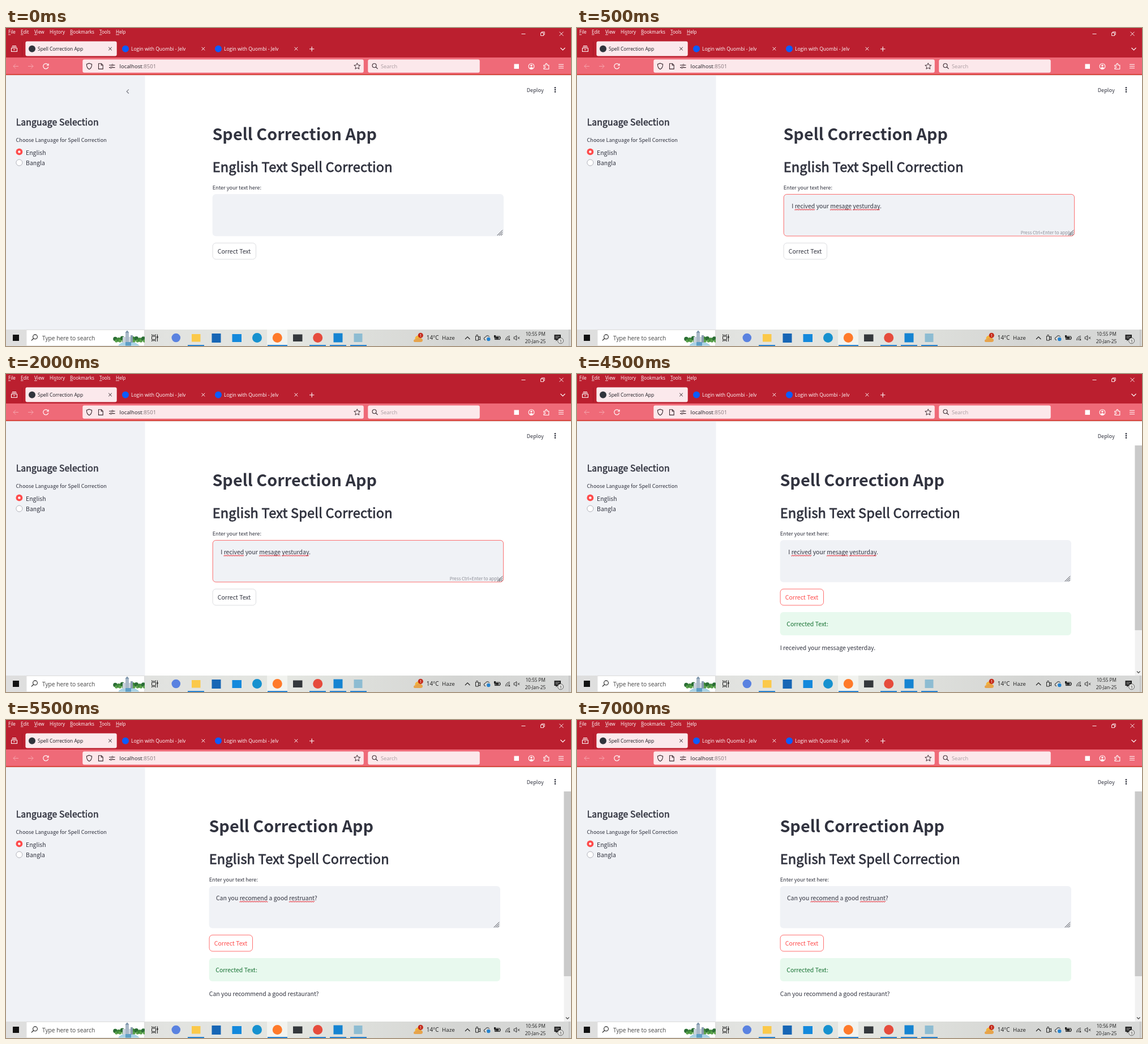
These frames come from a looping animation (998 px wide and 561 px high, 8 s). An HTML page with a canvas:

```html
<!DOCTYPE html>
<html lang="en">
<head>
<meta charset="utf-8">
<title>Spell Correction App</title>
<style>
html, body { margin: 0; width: 100%; height: 100%; overflow: hidden; background: #fff; }
canvas { display: block; width: 998px; height: 561px; }
</style>
</head>
<body>
<canvas id="stage"></canvas>
<script>
const W = 998, H = 561, LOOP = 8000;
const canvas = document.getElementById('stage');
const ctx = canvas.getContext('2d');
const ratio = window.devicePixelRatio || 1;
canvas.width = W * ratio;
canvas.height = H * ratio;

const PAGE = '"Noto Sans CJK JP", "Noto Sans CJK SC", sans-serif';
const UI = '"Open Sans", "Noto Sans", sans-serif';
const BODY = 10.47, LABEL = 9.16;
const INK = '#31333f', ACCENT = '#ff4b4b';

const scenes = [
  { start: 0, clock: '10:55 PM', arrow: true },
  { start: 500, clock: '10:55 PM', input: ' I recived your mesage yesturday.', focus: true },
  { start: 3000, clock: '10:55 PM', input: ' I recived your mesage yesturday.', result: 'I received your message yesterday.' },
  { start: 5500, clock: '10:56 PM', input: 'Can you recomend a good restruant?', result: 'Can you recommend a good restaurant?' }
];
const misspelled = ['recived', 'mesage', 'yesturday', 'recomend', 'restruant'];

function rect(x, y, w, h, color) {
  ctx.fillStyle = color;
  ctx.fillRect(x, y, w, h);
}

function box(x, y, w, h, r, fill, border, line = 0.8) {
  ctx.beginPath();
  ctx.roundRect(x, y, w, h, r);
  if (fill) { ctx.fillStyle = fill; ctx.fill(); }
  if (border) { ctx.strokeStyle = border; ctx.lineWidth = line; ctx.stroke(); }
}

function disc(x, y, r, fill, border, line = 0.8) {
  box(x - r, y - r, 2 * r, 2 * r, r, fill, border, line);
}

function stroke(d, color, line = 1) {
  ctx.strokeStyle = color;
  ctx.lineWidth = line;
  ctx.stroke(new Path2D(d));
}

function shape(d, color) {
  ctx.fillStyle = color;
  ctx.fill(new Path2D(d));
}

function text(str, x, y, size, color = INK, family = PAGE, weight = 400) {
  ctx.font = `${weight} ${size}px ${family}`;
  ctx.fillStyle = color;
  ctx.fillText(str, x, y);
}

// Semibold: regular glyphs with a thin outline.
function heading(str, x, y, size) {
  ctx.letterSpacing = size * 0.0095 + 'px';
  text(str, x, y, size);
  ctx.strokeStyle = INK;
  ctx.lineWidth = size * 0.034;
  ctx.strokeText(str, x, y);
  ctx.letterSpacing = '0px';
}

function cross(x, y, r, color, line) {
  stroke(`M${x - r} ${y - r}l${2 * r} ${2 * r}M${x + r} ${y - r}l${-2 * r} ${2 * r}`, color, line);
}

function magnifier(x, y, r, color, side) {
  disc(x, y, r, null, color, 1.1);
  stroke(`M${x + side * r * 0.7} ${y + r * 0.7}l${side * r} ${r}`, color, 1.2);
}

function menuBar() {
  const menu = [['File', 4, 0], ['Edit', 26, 0], ['View', 50, 0], ['History', 77, 2],
    ['Bookmarks', 113, 0], ['Tools', 165, 0], ['Help', 194, 0]];
  for (const [name, x, key] of menu) {
    text(name, x, 10.3, 8.15, '#fff', UI);
    const left = x + ctx.measureText(name.slice(0, key)).width;
    rect(left, 11.4, ctx.measureText(name[key]).width, 0.8, '#fff');
  }
  stroke('M910.5 10.5h7', '#fff', 0.9);
  stroke('M944.5 8.5h5v5h-5zM946.2 8.5v-1.7h5v5h-1.7', '#fff', 0.9);
  cross(981, 10.3, 3.5, '#fff', 0.9);
}

function tabs() {
  stroke('M10 33.5h9M9.5 35.5h10v6h-10zM11 31.5h7M12.8 38.3h3.4', '#fff', 1.1);
  rect(28, 24, 0.8, 26, '#a01827');
  box(34.4, 23.5, 161.3, 26, 3, '#fbe9ec');
  disc(46, 36.7, 6, '#30343c');
  text('Spell Correction App', 56, 40.2, 8.45, '#1c1b22', UI);
  cross(184, 36.6, 2.8, '#30242a', 1);
  for (const x of [211, 375]) {
    disc(x, 36.7, 6, '#0b5cff');
    text('Login with Quombi - Jelv', x + 10, 40.2, 8.55, '#fff', UI);
    cross(x + 137.4, 36.6, 2.8, '#fff', 1);
  }
  stroke('M536 37h8.4M540.2 32.8v8.4', '#fff', 1.1);
  stroke('M979.5 35l4 4 4-4', '#fff', 1.1);
}

function toolbar() {
  rect(0, 52, W, 29, '#ef6a78');
  rect(0, 81, W, 2, '#d8473f');
  rect(0, 83, W, 1, '#e6dcdc');
  stroke('M22 67.5h-9m4-4l-4 4 4 4M39 67.5h9m-4-4l4 4-4 4', '#f6a5ad', 1);
  stroke('M74.3 65a4.6 4.6 0 1 0 .5 3.6M75 62.8v3.2h-3.2', '#fff', 1.2);
  box(135.3, 55.4, 496.5, 23.4, 3, '#fce8eb');
  box(639.3, 55.4, 197.5, 23.4, 3, '#fce8eb');
  const dark = '#3b2b32';
  stroke('M147 62.2l4.6 1.7c0 4.2-1.3 7.3-4.6 8.9-3.3-1.6-4.6-4.7-4.6-8.9z', dark, 1.1);
  stroke('M163.5 62.7h5l2.7 2.7v7h-7.7zM168.3 62.7v3h2.9', dark, 1.1);
  stroke('M182 65.5h4.5M189.5 65.5h3M182 69.7h2M187 69.7h5.5', dark, 1.2);
  disc(188, 65.5, 1.4, null, dark, 1);
  disc(185.4, 69.7, 1.4, null, dark, 1);
  text('localhost', 200.5, 71.4, 9.6, '#1c1b22', UI);
  const width = ctx.measureText('localhost').width;
  text(':8501', 200.5 + width, 71.4, 9.6, '#85777c', UI);

  let star = '';
  for (let i = 0; i < 10; i++) {
    const a = i * Math.PI / 5, r = i % 2 ? 2.7 : 5.8;
    star += `${i ? 'L' : 'M'}${620.3 + r * Math.sin(a)} ${67.6 - r * Math.cos(a)}`;
  }
  stroke(star + 'z', dark, 1);
  magnifier(650.6, 66.2, 3.5, dark, 1);
  text('Search', 662, 71.4, 9.3, '#aa9ca1', UI);

  rect(897.5, 63.5, 8.5, 8.5, '#fff');
  disc(928, 67.7, 4.9, null, '#fff', 1.1);
  disc(928, 66.2, 1.7, '#fff');
  shape('M924.8 71a3.3 2.5 0 0 1 6.4 0q-3.2 2.2-6.4 0z', '#fff');
  stroke('M950 65.5h3v-1.5a1.4 1.4 0 0 1 2.8 0v1.5h3v7h-8.8v-2.3h1.5a1.2 1.2 0 0 0 0-2.4h-1.5z', '#fff', 1.1);
  stroke('M976 64.3h9M976 67.5h9M976 70.7h9', '#fff', 1);
}

function sidebar(scene) {
  rect(0, 84, 245.5, 448, '#f0f2f6');
  if (scene.arrow) stroke('M216.8 108.3l-3.6 3.6 3.6 3.6', '#777982', 1.2);
  heading('Language Selection', 17.7, 172.1, 15.7);
  text('Choose Language for Spell Correction', 17.5, 201.2, LABEL);
  disc(23.4, 218.4, 5.9, ACCENT);
  disc(23.4, 218.4, 2.2, '#fff');
  text('English', 35, 223.7, BODY);
  disc(23.4, 237.5, 5.5, '#fff', '#a6a8b0', 0.9);
  text('Bangla', 35, 242, BODY);
}

function squiggle(x, y, width) {
  ctx.beginPath();
  for (let d = 0; d <= width; d += 0.5) {
    ctx.lineTo(x + d, y + Math.sin(d * Math.PI / 1.5));
  }
  ctx.strokeStyle = '#e3242e';
  ctx.lineWidth = 1;
  ctx.stroke();
}

function inputText(str, x, y) {
  text(str, x, y, BODY);
  for (const word of misspelled) {
    const at = str.indexOf(word);
    if (at < 0) continue;
    squiggle(x + ctx.measureText(str.slice(0, at)).width, y + 2.4, ctx.measureText(word).width);
  }
}

function scrollbar() {
  rect(985.5, 126, 12.5, 406, '#f1f1f1');
  rect(985.5, 126, 12.5, 326, '#cacaca');
  stroke('M989 524.5l2.8 2.8 2.8-2.8', '#555', 1.3);
}

function page(scene) {
  const left = scene.result ? 358.7 : 364.7;
  text('Deploy', 919.8, 112.6, LABEL);
  for (const y of [105.2, 108.9, 112.6]) disc(970, y, 1.3, INK);
  text('Spell Correction App', left - 0.3, 198, 28.8, INK, PAGE, 700);
  heading('English Text Spell Correction', left, 254, 23.5);
  text('Enter your text here:', left, 285, LABEL);

  box(left, 293, 514.3, 74.3, 5.8, '#f0f2f6');
  if (scene.focus) box(left + 0.5, 293.4, 513.4, 73.6, 5.5, null, ACCENT);
  if (scene.input) inputText(scene.input, left + 12.2, 318);
  if (scene.focus) text('Press Ctrl+Enter to apply', 783.7, 364, 7.85, '#8b8d96');
  const grip = left + 512.5;
  stroke(`M${grip - 9.5} 366l9.5-9.5M${grip - 6.3} 366l6.3-6.3M${grip - 3.1} 366l3.1-3.1`, '#44464e', 1);

  const color = scene.result ? ACCENT : INK;
  box(left + 0.4, 379.3, 76.4, 28.7, 5.8, '#fff', scene.result ? ACCENT : '#d4d5d9');
  text('Correct Text', left + 9.1, 398.3, BODY, color);

  if (scene.result) {
    box(left, 420, 514.3, 41, 5.8, '#e8f9ee');
    text('Corrected Text:', left + 11.5, 445, BODY, '#177233');
    text(scene.result, left, 486.7, BODY);
    scrollbar();
  }
}

function searchArt() {
  ctx.save();
  ctx.beginPath();
  ctx.rect(188, 532, 57, 28.5);
  ctx.clip();
  shape('M198 561q4-8 18-8t20 8z', '#a9d3e6');
  for (let i = 0; i < 9; i++) {
    const x = 193 + i * 6.2;
    if (i === 3 || i === 4) continue;
    disc(x, 548.5 + 1.5 * Math.sin(i * 2), 3.8, i % 2 ? '#3f8a3b' : '#2c6e36');
    disc(x + 2, 552, 2.8, '#5aa14b');
  }
  rect(206, 545, 18, 10, '#c9d2dc');
  rect(211, 537, 6, 18, '#aab9c9');
  shape('M210.5 537.5l3.5-4 3.5 4z', '#7890a8');
  rect(220, 542, 4, 13, '#8a9cb0');
  rect(211, 554, 10, 7, '#5f9fc6');
  ctx.restore();
}

function appIcons() {
  rect(461, 532, 36, 29, '#f2f3ef');
  disc(300.3, 546.5, 7.8, '#5a82e0');
  rect(328, 540, 15.5, 13.5, '#fbc94a');
  rect(363.5, 539, 16, 16, '#1766b5');
  rect(399.5, 540, 16.5, 14, '#1489dc');
  disc(443.5, 546.5, 8.5, '#1691cf');
  disc(479.3, 546.5, 8.5, '#ff7a2a');
  rect(507, 540.5, 16.5, 12.5, '#34383c');
  disc(550.7, 546.5, 8.5, '#e64b3c');
  rect(578.5, 538.5, 16, 16, '#1584d2');
  rect(614.5, 539, 15, 15, '#8dbcd2');
  for (const [x, w] of [[321, 29], [462, 35], [536, 29], [572, 29], [608, 29]]) {
    rect(x, 559.2, w, 1.8, '#1479cf');
  }
}

function tray(clock) {
  const dark = '#202020';
  disc(728, 548, 5.5, '#f3b43c');
  shape('M720 552q0-3 4-3 3-4 7-1 5-1 5 3 0 3-4 3h-9q-3 0-3-2z', '#e6a34c');
  disc(732.3, 542.3, 4.6, '#c42b1c');
  text('1', 730.5, 545, 7, '#fff', UI);
  text('14°C', 742.8, 550.2, 9.9, dark, UI);
  text('Haze', 770, 550.2, 9.8, dark, UI);
  stroke('M811 549l4.2-4.2 4.2 4.2', dark, 1.1);
  stroke('M829.5 543.5h5v7.5h-5zM834.5 546l3-1.8v6l-3-1.8M830.5 541.5h3', dark, 1);
  stroke('M847 550.5a2.5 2.5 0 0 1-.3-5 4 4 0 0 1 7.2-.8', dark, 1);
  disc(852.3, 549, 3.2, '#2583cf');
  stroke('M863.5 544h9v5.5h-9zM873.2 545.5v2.5', dark, 1);
  rect(864.5, 545, 6, 3.6, dark);
  rect(862, 542, 3, 4, dark);
  for (const r of [2.5, 5, 7.5]) {
    stroke(`M${890 - r} 551a${r} ${r} 0 0 1 ${r} ${-r}`, dark, 0.9);
  }
  disc(889.3, 550.3, 1, dark);
  stroke('M897.2 545h2l2.5-2.5v8.5l-2.5-2.5h-2z', dark, 0.9);
  cross(905.5, 546.8, 1.8, dark, 0.9);
  text(clock, 917.7, 542.6, 8.15, dark, UI);
  text('20-Jan-25', 916.8, 555.7, 8.4, dark, UI);
  shape('M968.5 541h11.5v9h-6l-2.5 2.5v-2.5h-3z', dark);
  stroke('M970.5 544h7.5M970.5 546.7h5', '#ddd', 0.8);
  disc(979.6, 551.7, 5, '#e2e2e0', '#444', 0.8);
  text('1', 977.7, 554.6, 7.5, dark, UI);
  rect(994.5, 532, 0.8, 29, '#aaa');
}

function taskbar(clock) {
  const tone = ctx.createLinearGradient(0, 0, W, 0);
  tone.addColorStop(0, '#dedede');
  tone.addColorStop(0.5, '#e4e6e1');
  tone.addColorStop(0.8, '#d4d5d3');
  tone.addColorStop(1, '#d8d9d8');
  rect(0, 532, W, 29, tone);
  rect(12, 541, 11, 11, '#111');
  rect(35.5, 532, 209.5, 29, '#fff');
  box(35.9, 532.4, 208.7, 28.4, 0, null, '#c9c9c9', 0.7);
  magnifier(51.5, 544.8, 3.9, '#222', -1);
  text('Type here to search', 64, 550.7, 10.2, '#444', UI);
  searchArt();
  stroke('M257.5 544h7v5.5h-7zM257.5 540.5v1.5h7v-1.5M257.5 553v-1.5h7v1.5M267.5 540.5v12.5', '#222', 1);
  rect(266.3, 544, 2.4, 2.6, '#222');
  appIcons();
  tray(clock);
}

function draw(now) {
  const time = now % LOOP;
  const scene = scenes.findLast(s => time >= s.start);
  ctx.setTransform(ratio, 0, 0, ratio, 0, 0);
  rect(0, 0, W, H, '#fff');
  rect(0, 0, W, 52, '#bb1f2f');
  menuBar();
  tabs();
  toolbar();
  sidebar(scene);
  page(scene);
  taskbar(scene.clock);
}

const begin = performance.now();
function tick() {
  draw(performance.now() - begin);
  requestAnimationFrame(tick);
}
tick();
</script>
</body>
</html>
```
